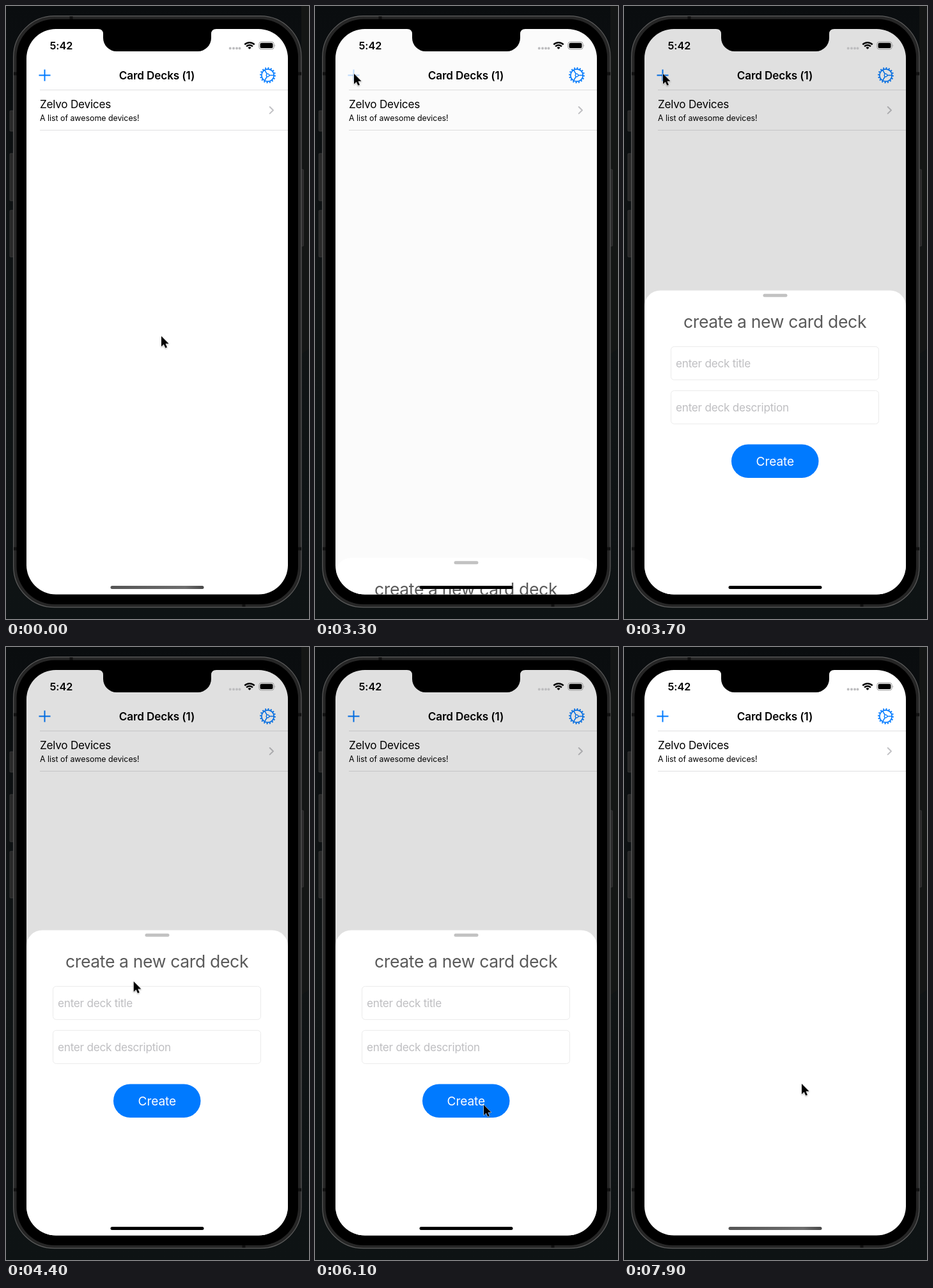
These frames come from a looping animation (474 by 960 pixels, 8000 ms). An HTML page:

```html
<!DOCTYPE html>
<html lang="en">
<head>
<meta charset="utf-8">
<title>Card Decks</title>
<style>
  html, body { margin: 0; width: 100%; height: 100%; overflow: hidden; background: #0e1113; }
  svg { display: block; width: 100%; height: 100%; }
  text { font-family: Inter, Roboto, sans-serif; }
  .bold { font-weight: 600; }
  .body { font-size: 17.2px; letter-spacing: -.26px; }
  .hint { fill: #bfbfc2; }
  .line { fill: none; stroke-linecap: round; stroke-linejoin: round; }
  .blue { stroke: #007aff; fill: none; }
  .field { fill: #fff; stroke: #ebebeb; }
</style>
</head>
<body>
<svg viewBox="0 0 474 960">
  <defs>
    <clipPath id="screen"><rect x="32" y="36" width="409" height="885.5" rx="46"/></clipPath>
    <linearGradient id="backdrop" x2="0" y2="1">
      <stop offset="0" stop-color="#0a0d0f"/>
      <stop offset=".5" stop-color="#101415"/>
      <stop offset="1" stop-color="#0e1314"/>
    </linearGradient>
    <linearGradient id="barGrey">
      <stop offset="0" stop-color="#555"/>
      <stop offset=".8" stop-color="#6e6e6e"/>
      <stop offset="1" stop-color="#484848"/>
    </linearGradient>
    <filter id="shadow" x="-50%" y="-50%" width="200%" height="200%">
      <feDropShadow dx="0" dy="1" stdDeviation="1" flood-opacity=".35"/>
    </filter>
  </defs>

  <rect width="474" height="960" fill="url(#backdrop)"/>
  <path d="M462 0H474V537L462 545Z" fill="#141615"/>

  <!-- phone body -->
  <g fill="#292929" stroke="#3a3a3a" stroke-width=".8">
    <rect x="6" y="164" width="7" height="32" rx="1"/>
    <rect x="6" y="231" width="7" height="74" rx="1"/>
    <rect x="6" y="320" width="7" height="73" rx="1"/>
    <rect x="461" y="256" width="4.5" height="120" rx="1"/>
  </g>
  <rect x="11.7" y="15.7" width="450.3" height="926" rx="64" fill="#262626" stroke="#5c5c5c" stroke-width="1.2"/>
  <path d="M12 106h5M12 850h5M457 106h5M457 850h5M102 16v5M372 936v5" stroke="#111" stroke-width="5"/>
  <rect x="16.5" y="20.5" width="440.5" height="916.5" rx="60"/>

  <g clip-path="url(#screen)">
    <rect x="32" y="36" width="409" height="886" fill="#fff"/>
    <path d="M53 131.5H441M53 194.5H441" stroke="#e0e0e1"/>
    <path id="plus" class="blue" d="M51.5 108.5h18M60.5 99.5v18" stroke-width="2"/>
    <g class="blue" transform="translate(409.5 108.5)">
      <circle r="9.7" stroke-width="1.7"/>
      <circle r="11.4" stroke-width="2" pathLength="64" stroke-dasharray="1.8 2.2"/>
      <circle r="2.3" stroke-width="1.3"/>
      <path d="M2.3 0H9.5M-1.2 2L-4.8 8.2M-1.2-2L-4.8-8.2" stroke-width="1.5"/>
    </g>
    <text class="bold" x="236" y="115" text-anchor="middle" font-size="17.2" letter-spacing="-.15">Card Decks (1)</text>
    <text class="body" x="53" y="160.3">Zelvo Devices</text>
    <text x="53" y="179.5" font-size="12.4" letter-spacing="-.02">A list of awesome devices!</text>
    <path class="line" d="M412.7 158l5.3 5.2-5.3 5.2" stroke="#c2c2c5" stroke-width="2"/>
    <rect id="dim" x="32" y="36" width="409" height="886"/>

    <text class="bold" x="68.5" y="68" font-size="16.25" letter-spacing="-.1">5:42</text>
    <path class="line" d="M350.7 66.2h.01M356 66.2h.01M361 66.2h.01M365.5 66.2h.01" stroke="#bdbdbf" stroke-width="4"/>
    <g class="line" stroke="#000" stroke-width="2.5" style="stroke-linecap:butt">
      <path d="M373.3 60.3a11 11 0 0 1 15.4 0M376.1 63.3a7 7 0 0 1 9.8 0"/>
      <path d="M378.4 65.2a3.7 3.7 0 0 1 5.2 0L381 67.8Z" fill="#000" stroke="none"/>
    </g>
    <rect x="395.8" y="56.1" width="23.4" height="11.7" rx="3.6" fill="none" stroke="#999"/>
    <rect x="397.5" y="57.8" width="20" height="8.3" rx="2.2"/>
    <path d="M420.5 60.2q1.8 1.8 0 3.6z" fill="#999"/>

    <!-- sheet, drawn with its top at 0 -->
    <g id="sheet">
      <rect x="32" width="409" height="520" rx="25" fill="#fff"/>
      <rect x="217.5" y="5.3" width="38" height="5" rx="2.5" fill="#c2c2c2"/>
      <text x="236" y="59" text-anchor="middle" font-size="26.6" letter-spacing="-.38" fill="#5a5a5a">create a new card deck</text>
      <rect class="field" x="73.5" y="88" width="325" height="52" rx="5"/>
      <rect class="field" x="73.5" y="157" width="325" height="52" rx="5"/>
      <text class="body hint" x="81" y="120.5">enter deck title</text>
      <text class="body hint" x="81" y="190">enter deck description</text>
      <rect x="168" y="241" width="136.5" height="52.5" rx="26.2" fill="#007aff"/>
      <text x="236.3" y="274.3" text-anchor="middle" font-size="19.1" letter-spacing="-.1" fill="#fff">Create</text>
    </g>
    <rect id="homeBar" x="163.5" y="908" width="146" height="5" rx="2.5"/>
  </g>
  <path d="M144 35V36q8 0 8 8V50a21 21 0 0 0 21 21H300a21 21 0 0 0 21-21V44q0-8 8-8V35Z"/>

  <path id="cursor" d="M0 0V16.3L3.8 12.8 6.3 18.6 9 17.4 6.5 11.8H11.6Z" stroke="#fff" stroke-width="1" paint-order="stroke" filter="url(#shadow)"/>
</svg>

<script>
  const LOOP = 8000, STEP = 100;
  const OPEN_TOP = 443.4, SCREEN_BOTTOM = 921.5, HIDDEN_TOP = 960;
  const OPEN_AT = 3266, DRAG_AT = 7300, RELEASE_AT = 7600;

  // time, x, y of the pointer tip
  const path = [
    [0, 243, 517], [900, 243, 517], [1400, 222, 455], [2000, 202, 163],
    [2200, 202, 163], [2900, 61, 106], [3900, 61, 106], [4700, 264, 717],
    [6200, 264, 717], [7200, 260, 510], [7300, 260, 510], [7600, 278, 684],
    [8000, 278, 684]
  ];

  const el = id => document.getElementById(id);
  const [plus, dim, sheet, homeBar, cursor] = ['plus', 'dim', 'sheet', 'homeBar', 'cursor'].map(el);
  const clamp = v => Math.max(0, Math.min(1, v));
  const mix = (a, b, k) => a + (b - a) * k;

  // critically damped spring from 0 to 1
  const spring = ms => {
    const s = Math.max(0, ms) * 0.0175;
    return 1 - (1 + s) * Math.exp(-s);
  };

  function pointerAt(t) {
    const i = path.findIndex(p => p[0] > t);
    const [t0, x0, y0] = path[i - 1], [t1, x1, y1] = path[i];
    const u = (t - t0) / (t1 - t0), k = u * u * (3 - 2 * u);
    return [mix(x0, x1, k), mix(y0, y1, k)];
  }

  function sheetTop(t, pointerY) {
    if (t < OPEN_AT) return HIDDEN_TOP;
    if (t < DRAG_AT) return mix(SCREEN_BOTTOM, OPEN_TOP, spring(t - OPEN_AT));
    return mix(OPEN_TOP + pointerY - 510, HIDDEN_TOP, spring(t - RELEASE_AT));
  }

  function draw(t) {
    const [x, y] = pointerAt(t);
    const top = sheetTop(t, y);
    const shown = clamp((SCREEN_BOTTOM - top) / (SCREEN_BOTTOM - OPEN_TOP));
    cursor.setAttribute('transform', `translate(${x} ${y})`);
    sheet.setAttribute('transform', `translate(0 ${top})`);
    dim.setAttribute('opacity', 0.122 * shown);
    homeBar.setAttribute('fill', shown > 0 ? '#000' : 'url(#barGrey)');
    plus.setAttribute('opacity', t < 3200 ? 1 : mix(0.25, 1, clamp((t - 3300) / 350)));
  }

  const start = performance.now();
  function tick(now) {
    const t = Math.max(0, now - start) % LOOP;
    draw(Math.floor(t / STEP) * STEP);
    requestAnimationFrame(tick);
  }
  draw(0);
  requestAnimationFrame(tick);
</script>
</body>
</html>
```
